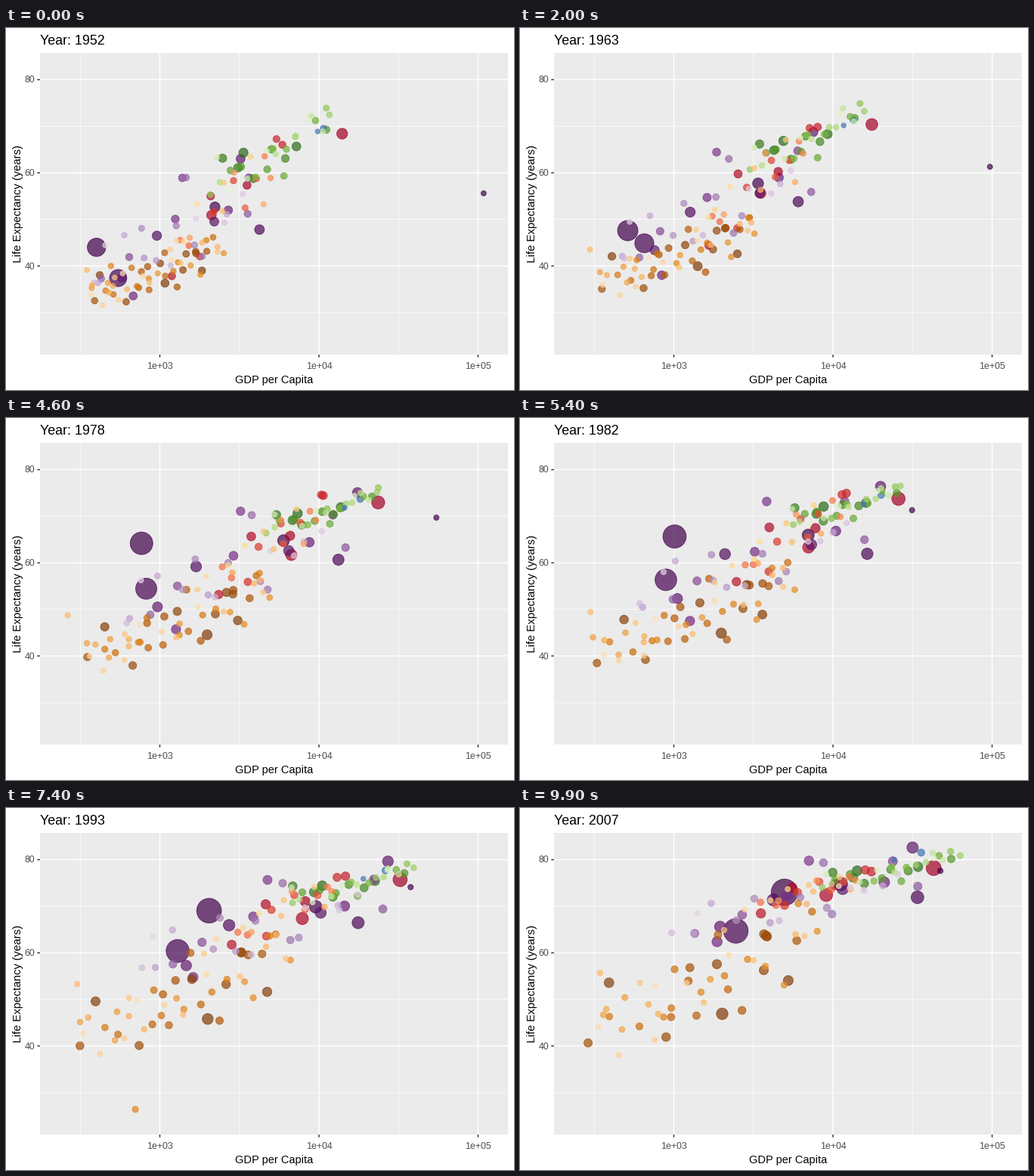
These frames come from a looping animation (672 by 480 pixels, 10000 ms). A matplotlib script:

```python
import numpy as np
import matplotlib.pyplot as plt
from matplotlib.animation import FuncAnimation
from matplotlib.colors import LinearSegmentedColormap
from matplotlib.patches import Rectangle

W, H, DPI = 672, 480, 96
FRAMES, INTERVAL = 100, 100
YEARS = np.arange(1952, 2008, 5)    # motion is linear between these
ERAS = (1952, 1980, 2007)
ALPHA = 0.7
PT = 72 / DPI                       # points per pixel

plt.rcParams["font.family"] = "Liberation Sans"


def px(log_gdp):
    return 203.5 + 210.5 * (log_gdp - 3)


def py(life):
    return 68.5 + 6.175 * (80 - life)


def radius(pop):
    return 3 + 14.5 * np.sqrt(pop / 1319)


class Group:
    """Cloud of dots; each era gives log income mean, sd, life mean, sd."""

    def __init__(self, count, top, growth, ramp, *eras):
        self.count, self.top, self.growth = count, top, growth
        self.cmap = LinearSegmentedColormap.from_list("ramp", ramp.split())
        self.eras = np.transpose(eras)

    def paths(self, rng):
        gm, gs, lm, ls = (np.interp(YEARS, ERAS, row) for row in self.eras)
        income = rng.permutation(np.linspace(-1.7, 1.7, self.count))
        for z in income:
            health = np.clip(0.75 * z + 0.6 * rng.normal(), -1.8, 1.7)
            wobble = rng.normal(0, 0.08, (2, YEARS.size))
            yield gm + gs * (z + wobble[0]), lm + ls * (health + wobble[1])


AFRICA = Group(50, 85, 3.9, "#7F3B08 #B35806 #E08214 #FDB863 #FEE0B6",
               (2.95, 0.25, 39, 4), (3.1, 0.36, 48.5, 6), (3.17, 0.42, 55, 8.5))
AMERICAS = Group(23, 100, 2.8, "#A50026 #D73027 #F46D43 #FDAE61 #FEE090",
                 (3.42, 0.2, 53, 8), (3.73, 0.2, 65, 6), (3.88, 0.2, 73.3, 2.5))
ASIA = Group(29, 230, 2.5, "#40004B #762A83 #9970AB #C2A5CF #E7D4E8",
             (3.1, 0.3, 46.5, 8), (3.5, 0.42, 60, 8), (3.78, 0.45, 71, 5.5))
EUROPE = Group(30, 85, 1.3, "#276419 #4D9221 #7FBC41 #B8E186 #E6F5D0",
               (3.7, 0.22, 65, 5), (4.05, 0.2, 72, 2.5), (4.35, 0.26, 78, 2.3))
OCEANIA = Group(2, 20, 2.3, "#4575B4 #4575B4",
                (4.01, 0.01, 69.2, 0.2), (4.23, 0.03, 73, 0.6),
                (4.47, 0.05, 80.7, 0.5))

# Dots that stand out: group, shade, final population, (year, income, life)
LEADS = [
    (ASIA, 0, 1319, (1952, 400, 44), (1962, 488, 44.5), (1967, 613, 58.4),
     (1977, 741, 64), (1987, 1379, 67.3), (2007, 4959, 73)),
    (ASIA, 0.03, 1110, (1952, 547, 37.4), (1977, 813, 54.2),
     (1987, 977, 58.5), (2007, 2452, 64.7)),
    (ASIA, 0.15, 127, (1952, 3217, 63), (1972, 14800, 73.4),
     (1992, 26800, 79.4), (2007, 31656, 82.6)),
    (ASIA, 1, 2.5, (1952, 108400, 55.6), (1962, 95500, 60.5),
     (1972, 109300, 67.7), (1982, 31400, 71.3), (2007, 47300, 77.6)),
    (AMERICAS, 0, 301, (1952, 13990, 68.4), (2007, 42950, 78.2)),
    (AMERICAS, 0.04, 190, (1952, 2109, 50.9), (1977, 6660, 61.5),
     (2007, 9066, 72.4)),
    (AFRICA, 0, 135, (1952, 1077, 36.3), (1977, 1982, 44.5),
     (2007, 2014, 46.9)),
    (AFRICA, 0.5, 9, (1952, 493, 40), (1987, 848, 44), (1992, 737, 23.6),
     (1997, 590, 36.1), (2007, 863, 46.2)),
]


def build_dots():
    rng = np.random.default_rng(11)
    rows = []

    def add(group, shade, pop, log_gdp, life):
        size = radius(pop * np.linspace(1 / group.growth, 1, YEARS.size))
        color = (*group.cmap(shade)[:3], ALPHA)
        rows.append((px(log_gdp), py(life), size, color))

    for group in (OCEANIA, AFRICA, AMERICAS, ASIA, EUROPE):
        shades = np.linspace(0.02, 1, group.count)
        for shade, path in zip(shades, group.paths(rng)):
            add(group, shade, group.top * np.exp(-4.2 * shade), *path)
    for group, shade, pop, *points in LEADS:
        year, gdp, life = np.transpose(points)
        add(group, shade, pop, np.interp(YEARS, year, np.log10(gdp)),
            np.interp(YEARS, year, life))

    rows.sort(key=lambda row: -row[2][-1])
    return map(np.array, zip(*rows))


def line(x, y, color, width):
    ax.plot(x, y, color=color, lw=width * PT, zorder=1, snap=False,
            solid_capstyle="butt")


def label(x, y, text, size, color="black", **kw):
    return ax.text(x, y, text, fontsize=size * PT, color=color,
                   va="baseline", **kw)


fig = plt.figure(figsize=(W / DPI, H / DPI), dpi=DPI, facecolor="white")
ax = fig.add_axes([0, 0, 1, 1])
ax.set_xlim(0, W)
ax.set_ylim(H, 0)
ax.axis("off")

L, T, R, B = 45, 33, 664, 433
MAJOR, MINOR = 1.42, 0.71
ax.add_patch(Rectangle((L, T), R - L, B - T, fc="#EBEBEB", lw=0, zorder=0))

for g in np.arange(2.5, 5.1, 0.5):
    major = g % 1 == 0
    line([px(g)] * 2, [T, B], "white", MAJOR if major else MINOR)
    if major:
        line([px(g)] * 2, [B, B + 3.7], "#333333", MAJOR)
        label(px(g), 452, f"1e+{int(g):02d}", 12.4, "#4D4D4D", ha="center")
for life in range(30, 81, 10):
    major = life % 20 == 0
    line([L, R], [py(life)] * 2, "white", MAJOR if major else MINOR)
    if major:
        line([L - 3.7, L], [py(life)] * 2, "#333333", MAJOR)
        label(38, py(life) + 4, str(life), 12.4, "#4D4D4D", ha="right")

title = label(45, 22, "", 17.9, ha="left")
label(354.5, 471, "GDP per Capita", 14.67, ha="center")
label(20, 233, "Life Expectancy (years)", 14.9, ha="center",
      rotation=90, rotation_mode="anchor")

X, Y, RADII, COLORS = build_dots()
dots = ax.scatter(X[:, 0], Y[:, 0], c=COLORS, edgecolors=COLORS,
                  linewidths=0.945 * PT, zorder=2)


def at(rows, t):
    i = min(int(t), YEARS.size - 2)
    return rows[:, i] + (rows[:, i + 1] - rows[:, i]) * (t - i)


def update(frame):
    t = (YEARS.size - 1) * frame / (FRAMES - 1)
    dots.set_offsets(np.column_stack([at(X, t), at(Y, t)]))
    dots.set_sizes((2 * at(RADII, t) * PT) ** 2)
    title.set_text(f"Year: {round(YEARS[0] + 5 * t)}")
    return dots, title


anim = FuncAnimation(fig, update, frames=FRAMES, interval=INTERVAL,
                     repeat=True, repeat_delay=0, blit=False)
plt.show()
```
